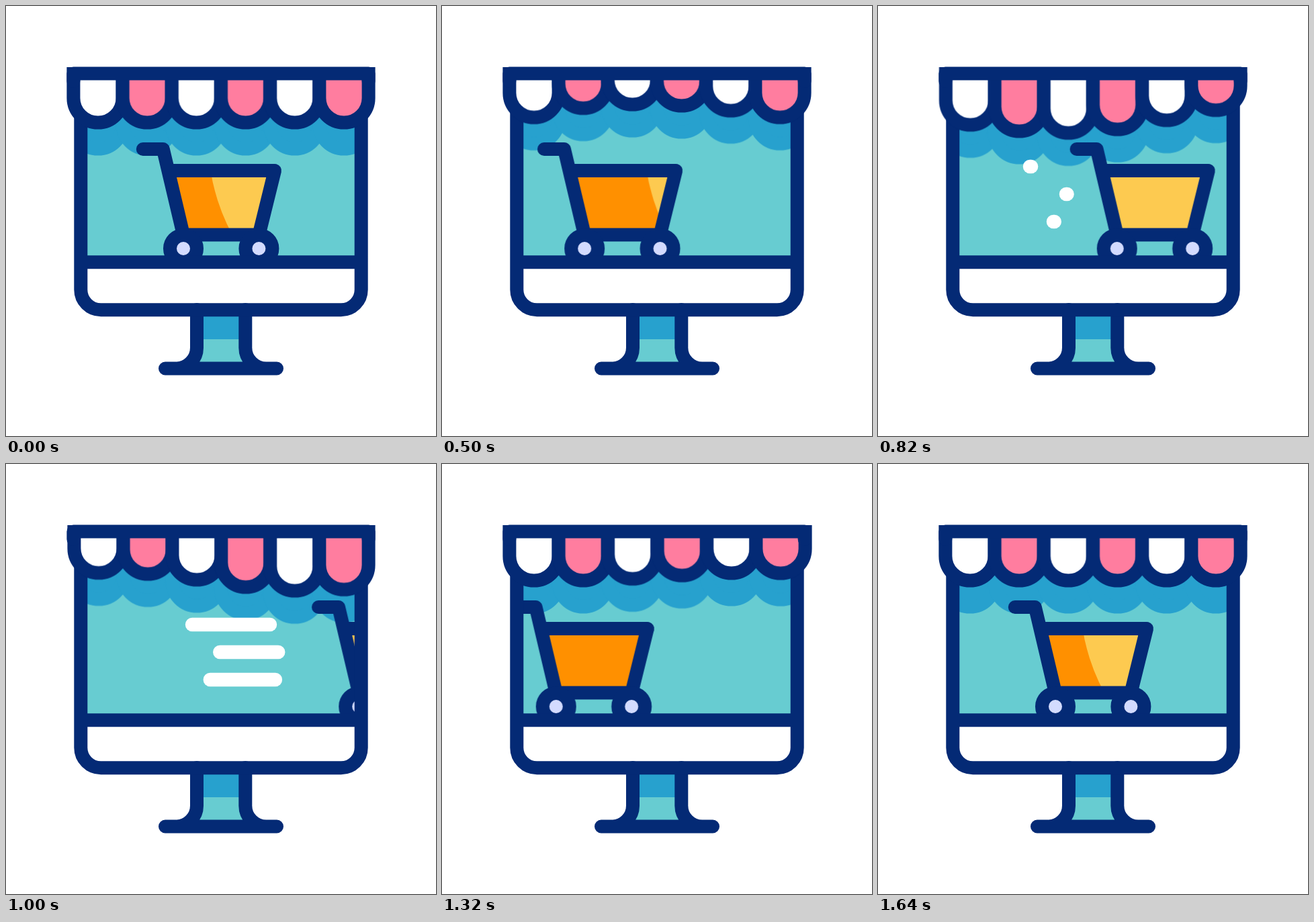
An HTML page that plays this animation: 640 by 640 pixels, repeating every 2.4 s.

```html
<!DOCTYPE html>
<html lang="en">
<head>
<meta charset="utf-8">
<title>Online shop</title>
<style>
  @property --head { syntax: "<length>"; inherits: false; initial-value: 0px; }
  @property --tail { syntax: "<length>"; inherits: false; initial-value: 0px; }

  :root {
    --navy: #042a75;
    --teal: #67ccd1;
    --blue: #27a1ce;
    --loop: 2400ms;
  }
  html, body { margin: 0; height: 100%; overflow: hidden; background: #fff; }
  svg { display: block; width: 100%; height: 100%; }

  .line {
    fill: none;
    stroke: var(--navy);
    stroke-width: 20;
    stroke-linecap: round;
    stroke-linejoin: round;
  }

  /* Awning: every scallop plays the same bounce, a little later than its left neighbour */
  .scallop {
    animation: bounce var(--loop) ease-in-out infinite;
    animation-delay: calc(var(--i) * 75ms);
  }
  .scallop path { stroke: var(--navy); stroke-width: 20; }
  .shade path { fill: var(--blue); stroke: var(--blue); }
  @keyframes bounce {
    0%, 52.708%, 100% { transform: translate(0, 0); }
    14.167% { transform: translate(0, -27px); }
    28.333% { transform: translate(0, 15.5px); }
    40.833% { transform: translate(1px, -11.5px); }
  }

  /* Cart: wind up, dash off to the right, roll in from the left */
  .cart { animation: drive var(--loop) infinite; }
  .still { animation: undrive var(--loop) infinite; }
  @keyframes drive {
    0% { transform: translateX(0); animation-timing-function: ease-in-out; }
    21.667% { transform: translateX(-52px); animation-timing-function: ease-in; }
    44.79% { transform: translateX(345px); animation-timing-function: step-end; }
    44.8% { transform: translateX(-318px); animation-timing-function: ease-out; }
    64.583%, 100% { transform: translateX(0); }
  }
  @keyframes undrive {
    0% { transform: translateX(0); animation-timing-function: ease-in-out; }
    21.667% { transform: translateX(52px); animation-timing-function: ease-in; }
    44.79% { transform: translateX(-345px); animation-timing-function: step-end; }
    44.8% { transform: translateX(318px); animation-timing-function: ease-out; }
    64.583%, 100% { transform: translateX(0); }
  }

  /* Speed lines: the tail follows the head 100 ms later */
  .speed {
    fill: none;
    stroke: #fff;
    stroke-width: 20.5;
    stroke-linecap: round;
    stroke-dasharray: calc(var(--head) - var(--tail)) 300px;
    stroke-dashoffset: calc(0px - var(--tail));
    animation: head var(--loop) ease-in-out infinite,
               tail var(--loop) ease-in-out infinite,
               flash var(--loop) step-end infinite;
  }
  @keyframes head {
    0%, 33.333% { --head: 0px; }
    45.833%, 100% { --head: 100px; }
  }
  @keyframes tail {
    0%, 37.5% { --tail: 0px; }
    50%, 100% { --tail: 100px; }
  }
  @keyframes flash {
    0%, 49.9% { opacity: 0; }
    33.4% { opacity: 1; }
    100% { opacity: 0; }
  }
</style>
</head>
<body>
<svg viewBox="0 0 640 640">
  <defs>
    <clipPath id="screen"><rect x="111" y="100" width="418" height="292"/></clipPath>
    <clipPath id="belowTop"><rect x="0" y="91" width="640" height="549"/></clipPath>
    <clipPath id="basket"><path d="M241.3 245H399.7L376.4 341H264Z"/></clipPath>
  </defs>

  <!-- stand -->
  <path d="M284 452H356V508L372 539H268L284 508Z" fill="var(--teal)"/>
  <path d="M284 452H356V496H284Z" fill="var(--blue)"/>
  <path class="line" d="M284 452V508A31 31 0 0 1 253 539.5M356.3 452V508A31 31 0 0 0 387.3 539.5M237 539.5H403"/>

  <!-- screen -->
  <path d="M111 105H529V381H111Z" fill="var(--teal)"/>
  <g clip-path="url(#screen)">
    <g id="shades" transform="translate(0 39)"></g>
    <path class="speed" pathLength="100" d="M226 239H442"/>
    <path class="speed" pathLength="100" d="M280 280H442"/>
    <path class="speed" pathLength="100" d="M261 321H442"/>
    <g class="cart">
      <g clip-path="url(#basket)">
        <path d="M241 245H400V341H241Z" fill="#fdca50"/>
        <path class="still" d="M-200 245H304.5Q312 294 337 341H-200Z" fill="#ff9000"/>
      </g>
      <path class="line" d="M203.8 213H233.8L264 340.6H376.4L400 245H243"/>
      <g class="line" style="fill:#d3dbff">
        <circle cx="264" cy="361" r="20"/>
        <circle cx="376.4" cy="361" r="20"/>
      </g>
    </g>
  </g>
  <path class="line" d="M111.3 122V422.3A30 30 0 0 0 141.3 452.3H498.7A30 30 0 0 0 528.7 422.3V122M111.3 381.2H528.7"/>

  <!-- awning -->
  <g id="awning" clip-path="url(#belowTop)"></g>
  <path class="line" d="M100.4 112V100.4H539.6V112"/>
</svg>
<script>
  const scallops = (kind, fills) => Array.from({ length: 6 }, (_, i) => `
    <g transform="translate(${137 + i * 73.2} 0)">
      <g class="scallop ${kind}" style="--i:${i}">
        <path d="M-36.6 40V137A36.6 36.6 0 0 0 36.6 137V40" fill="${fills[i % 2]}"/>
      </g>
    </g>`).join("");

  document.getElementById("shades").innerHTML = scallops("shade", ["none", "none"]);
  document.getElementById("awning").innerHTML = scallops("", ["#fff", "#ff7d9f"]);
</script>
</body>
</html>
```
